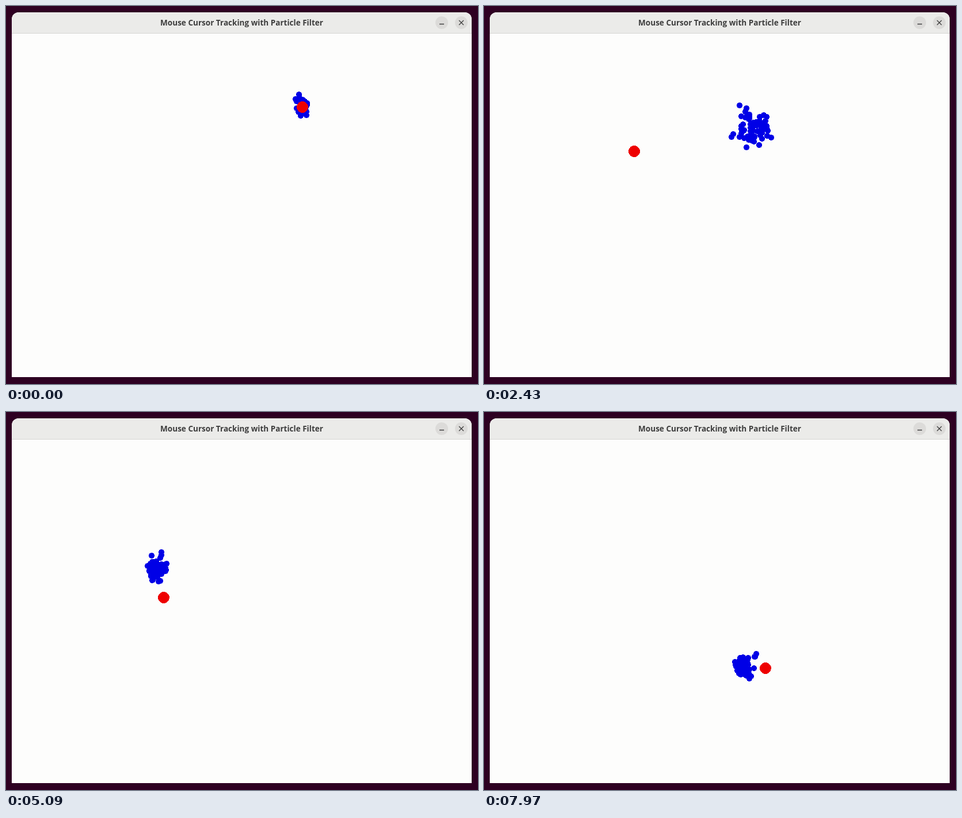
Write an HTML page that moves like this. It is 820 by 658 pixels and loops after 8000 ms.

```html
<!DOCTYPE html>
<html lang="en">
<head>
<meta charset="utf-8">
<title>Mouse Cursor Tracking with Particle Filter</title>
<style>
  html, body { margin: 0; width: 100%; height: 100%; overflow: hidden; background: #2e0022; }
  svg { display: block; width: 820px; height: 658px; }
  text { font: 700 13.55px "Open Sans", "Noto Sans", sans-serif; fill: #3d3d3d; }
</style>
</head>
<body>
<svg viewBox="0 0 820 658">
  <rect width="820" height="658" fill="#2e0022"/>
  <path d="M10 646V23a12 12 0 0 1 12-12H797a12 12 0 0 1 12 12V646Z" fill="#fdfdfc"/>
  <path d="M10 47V23a12 12 0 0 1 12-12H797a12 12 0 0 1 12 12V47Z" fill="#ebebe9"/>
  <rect x="10" y="47" width="799" height="1" fill="#d6d5d2"/>
  <text x="409.5" y="34" text-anchor="middle">Mouse Cursor Tracking with Particle Filter</text>
  <g fill="#dcdbd9"><circle cx="757" cy="29" r="11"/><circle cx="791" cy="29" r="11"/></g>
  <path d="M753 31.5h8M787 25l8 8m0-8l-8 8" fill="none" stroke="#3d3d3d" stroke-width="1.3"/>
  <g id="cloud" fill="#0000e6" shape-rendering="crispEdges"></g>
  <circle id="cursor" r="10" fill="#ee0000" shape-rendering="crispEdges"/>
</svg>
<script>
const LOOP = 8000, STEPS = 234, COUNT = 70, PARENTS = 24, CELL = 12;

// Waypoints: time, x, y
const cursorPath = [
  [0, 515, 176], [1100, 530, 225], [1570, 310, 244], [1720, 261, 252], [4000, 261, 254],
  [5090, 274, 323], [6220, 392, 461], [7210, 468, 450], [7970, 489, 446]
];
const cloudPath = [
  [0, 515, 175], [1570, 525, 226], [3250, 414, 202],
  [5090, 263, 275], [6220, 288, 397], [7970, 454, 443]
];

function along(path, t) {
  let i = 1;
  while (i < path.length - 1 && path[i][0] < t) i++;
  const [t0, x0, y0] = path[i - 1], [t1, x1, y1] = path[i];
  const u = Math.min(1, (t - t0) / (t1 - t0));
  return [x0 + (x1 - x0) * u, y0 + (y1 - y0) * u];
}

function hash(a, b) {
  const s = Math.sin(a * 127.1 + b * 311.7 + 17.3) * 43758.5453;
  return s - Math.floor(s);
}

const gauss = (a, b) => 2 * (hash(a, b) + hash(a + 400, b) + hash(a + 800, b) - 1.5);

// Slowly wandering unit-variance noise
function drift(id, step) {
  const phase = step / CELL + hash(id, 999);
  const cell = Math.floor(phase), u = phase - cell;
  return (gauss(id, cell) * (1 - u) + gauss(id, cell + 1) * u) / Math.hypot(u, 1 - u);
}

// Resampled particles stay near a shared parent
const scatter = (i, axis, step) =>
  0.9 * drift(i % PARENTS + axis, step) + 0.45 * drift(i + axis + 50, step);

const cloud = document.getElementById("cloud");
const cursor = document.getElementById("cursor");
const dots = Array.from({ length: COUNT }, () => {
  const dot = document.createElementNS(cloud.namespaceURI, "circle");
  dot.setAttribute("r", 5);
  return cloud.appendChild(dot);
});

function place(dot, x, y) {
  dot.setAttribute("cx", Math.round(x));
  dot.setAttribute("cy", Math.round(y));
}

function draw(time) {
  const step = Math.min(STEPS - 1, Math.floor((time + 5) / LOOP * STEPS));
  const t = step / STEPS * LOOP;
  const [mx, my] = along(cursorPath, t);
  const [cx, cy] = along(cloudPath, t);
  // The cloud widens as the cursor gets away from it
  const spread = 6 + 0.05 * Math.min(170, Math.hypot(mx - cx, my - cy));
  dots.forEach((dot, i) => place(dot,
    cx + 0.9 * spread * scatter(i, 0, step),
    cy + 1.2 * spread * scatter(i, 150, step)));
  place(cursor, mx, my);
}

const start = performance.now();
function tick() {
  draw((performance.now() - start) % LOOP);
  requestAnimationFrame(tick);
}
tick();
</script>
</body>
</html>
```
